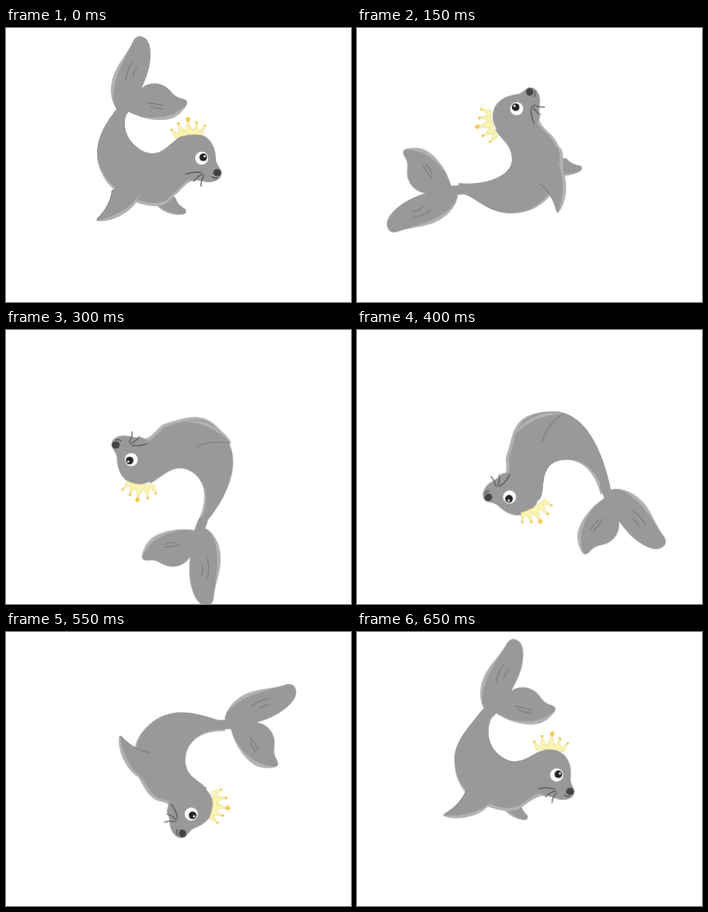
An HTML page without scripts that plays this animation: 432 px wide and 343 px high, repeating every 700 ms.

```html
<!DOCTYPE html>
<html lang="en">
<head>
<meta charset="utf-8">
<title>Seal doing a backflip</title>
<style>
html, body { margin: 0; width: 100%; height: 100%; overflow: hidden; background: #fff; }
svg { display: block; width: 432px; height: 343px; }

.main { fill: #999; }
.light { fill: #b2b2b2; }
.line { fill: none; stroke: #707070; stroke-width: .9; stroke-linecap: round; }
.whisker { fill: none; stroke: #505050; stroke-width: 1.2; stroke-linecap: round; }
.stem { fill: none; stroke: #999; stroke-width: 12; stroke-linecap: round; }

/* Poses are relative to the spinning stage; steps() gives one pose per 50 ms. */
.spin, .torso, .head, .crown, .tail, .near, .far { animation: 700ms infinite; }
.spin { animation-name: spin; }
.torso { animation-name: torso; }
.head { animation-name: head; }
.crown { animation-name: crown; }
.tail { animation-name: tail; }
.near { animation-name: near; }
.far { animation-name: far; }

@keyframes spin {
  0% { transform: rotate(0deg); animation-timing-function: steps(3); }
  21.42% { transform: rotate(-90deg); animation-timing-function: steps(2); }
  35.71% { transform: rotate(-180deg); animation-timing-function: steps(3); }
  57.14% { transform: rotate(-270deg); animation-timing-function: steps(2); }
  71.42% { transform: rotate(-270deg); animation-timing-function: steps(2); }
  85.71%, 100% { transform: rotate(-360deg); }
}
@keyframes torso {
  0% { d: path("M-71 -64C-84 -48 -96 -29 -96 -7S-80 43 -45 54S-7 51 2 44S16 26 28 26L12 -31C-2 -25 -10 -8 -27 -8S-72 -33 -57 -61Z"); animation-timing-function: steps(3); }
  21.42% { d: path("M-43 -88C-37 -65 -67 -55 -67 -15S-30 48 -5 48S10 45 22 40S40 18 54 18L38 -37C25 -30 20 -16 0 -16S-33 -50 -29 -82Z"); animation-timing-function: steps(2); }
  35.71% { d: path("M-11 -75C-48 -61 -78 -30 -76 5S-58 49 -35 55S-12 59 -2 55S14 47 23 56L35 -4C18 -1 -4 7 -16 -8S-32 -45 6 -79Z"); animation-timing-function: steps(3); }
  57.14% { d: path("M31 -107C10 -102 -63 -85 -63 -35S-35 14 -17 20S-5 23 7 23S17 27 19 32L49 -18C35 -26 23 -20 8 -29S-13 -82 41 -95Z"); animation-timing-function: steps(2); }
  71.42% { d: path("M0 -96C-15 -75 -47 -58 -47 -20S-5 37 15 36S40 30 47 23S55 22 65 29L63 -31C50 -30 43 -20 27 -22S-19 -52 13 -92Z"); animation-timing-function: steps(2); }
  85.71% { d: path("M9 -64C-40 -53 -62 -40 -66 -2S-50 45 -30 57S-5 65 3 63S14 61 19 71L40 16C26 14 12 17 2 6S-18 -29 21 -58Z"); animation-timing-function: steps(1); }
  92.85%, 100% { d: path("M-52 -69C-69 -47 -88 -29 -88 -5S-79 42 -45 54S-5 54 5 48S20 38 33 40L18 -14C10 -12 0 -3 -13 -3S-59 -23 -39 -63Z"); }
}
@keyframes head {
  0% { transform: translate(35px, -2px) rotate(0deg); animation-timing-function: steps(3); }
  21.42% { transform: translate(64px, -10px) rotate(-5deg); animation-timing-function: steps(2); }
  35.71% { transform: translate(45px, 34px) rotate(23deg); animation-timing-function: steps(3); }
  57.14% { transform: translate(44px, 19px) rotate(46deg); animation-timing-function: steps(2); }
  71.42% { transform: translate(78px, 3px) rotate(14deg); animation-timing-function: steps(2); }
  85.71% { transform: translate(42px, 55px) rotate(39deg); animation-timing-function: steps(1); }
  92.85%, 100% { transform: translate(40px, 14px) rotate(8deg); }
}
@keyframes crown {
  0% { transform: translate(19px, -31px) rotate(0deg); animation-timing-function: steps(3); }
  21.42% { transform: translate(45px, -40px) rotate(-8deg); animation-timing-function: steps(2); }
  35.71% { transform: translate(47px, 0px) rotate(32deg); animation-timing-function: steps(3); }
  57.14% { transform: translate(57px, -11px) rotate(67deg); animation-timing-function: steps(2); }
  71.42% { transform: translate(87px, -22px) rotate(58deg); animation-timing-function: steps(2); }
  85.71% { transform: translate(55px, 27px) rotate(58deg); animation-timing-function: steps(1); }
  92.85%, 100% { transform: translate(32px, -18px) rotate(10deg); }
}
@keyframes tail {
  0% { transform: translate(-62px, -62px) rotate(0deg); animation-timing-function: steps(3); }
  21.42% { transform: translate(-38px, -89.5px) rotate(-44deg); animation-timing-function: steps(2); }
  35.71% { transform: translate(2px, -83px) rotate(1.5deg); animation-timing-function: steps(3); }
  57.14% { transform: translate(41.6px, -104px) rotate(29deg); animation-timing-function: steps(2); }
  71.42% { transform: translate(8px, -104px) rotate(-23deg); animation-timing-function: steps(2); }
  85.71% { transform: translate(20.5px, -63px) rotate(28deg); animation-timing-function: steps(1); }
  92.85%, 100% { transform: translate(-41px, -65.5px) rotate(5deg); }
}
@keyframes near {
  0% { transform: translate(-77px, 38px) rotate(0deg); animation-timing-function: steps(3); }
  21.42% { transform: translate(-30px, 19px) rotate(31deg); animation-timing-function: steps(2); }
  35.71% { transform: translate(-39px, 13px) rotate(80deg); animation-timing-function: steps(3); }
  57.14% { transform: translate(-25px, -22px) rotate(97deg); animation-timing-function: steps(2); }
  71.42% { transform: translate(-8px, 10px) rotate(41deg); animation-timing-function: steps(2); }
  85.71% { transform: translate(-55px, 13px) rotate(53deg); animation-timing-function: steps(1); }
  92.85%, 100% { transform: translate(-73px, 33px) rotate(15deg); }
}
@keyframes far {
  0% { transform: translate(15px, 65px) rotate(0deg); animation-timing-function: steps(3); }
  21.42% { transform: translate(-10px, 71px) rotate(68deg); animation-timing-function: steps(2); }
  35.71% { transform: translate(-66px, 47px) rotate(105deg); animation-timing-function: steps(3); }
  57.14% { transform: translate(-40px, -40px) rotate(100deg); animation-timing-function: steps(2); }
  71.42% { transform: translate(-25px, 20px) rotate(50deg); animation-timing-function: steps(2); }
  85.71% { transform: translate(-40px, 30px) rotate(55deg); animation-timing-function: steps(1); }
  92.85%, 100% { transform: translate(3px, 68px) rotate(15deg); }
}
</style>
</head>
<body>
<svg viewBox="0 0 432 343">
  <defs>
    <clipPath id="torso-clip"><path class="torso"/></clipPath>
  </defs>
  <g transform="translate(210 165)">
    <g class="spin">
      <g class="far">
        <path class="main" d="M-37 -9C-30 0 -15 6 -2 3Q2 1 0 -3Q-10 -8 -13 -18L-25 -24Z"/>
        <path class="light" d="M-37 -9C-30 0 -15 6 -2 3C-14 3 -26 -1 -37 -9Z"/>
      </g>

      <path class="torso light"/>
      <g clip-path="url(#torso-clip)">
        <g transform="translate(0 -4)"><path class="torso main"/></g>
      </g>

      <g class="tail">
        <path class="stem" d="M2 -3L-8 9"/>
        <path class="main" d="M-9 -1C-17 -12 -19 -28 -13 -44C-8 -58 4 -71 10 -84C13 -92 18 -94 23 -92C31 -89 33 -80 33 -70C33 -52 27 -40 22 -28C28 -33 36 -35 44 -33C56 -30 60 -20 66 -17C72 -14 78 -15 79 -10C79 -5 72 2 63 8C46 16 20 10 4 1Z"/>
        <path class="light" d="M-13 -8C-17 -18 -18 -30 -13 -44C-8 -58 4 -71 10 -84C2 -66 -8 -50 -11 -36C-14 -24 -14 -16 -13 -8Z"/>
        <path class="light" d="M78 -7C74 2 66 8 60 10C46 15 28 11 16 7C32 10 50 10 62 4C70 0 75 -5 78 -7Z"/>
        <path class="line" d="M2 -37Q3 -50 10 -60M11 -42Q12 -50 16 -55M29 -9Q38 -9 48 -6M33 -5Q40 -2 48 -2"/>
      </g>

      <g class="head">
        <path class="main" d="M-34 14L-13 28C-6 26 2 30 10 30C20 29 25 25 25 18C24 12 19 10 18 2C18 -14 10 -31 -10 -31C-22 -31 -32 -22 -38 -16Z"/>
        <circle r="8.2" fill="#fff"/>
        <circle cx="2" cy="-1.2" r="4.8" fill="#222"/>
        <circle cx="3.8" cy="-2.4" r="1.4" fill="#fff"/>
        <ellipse cx="19.5" cy="18" rx="5" ry="4.5" fill="#444"/>
        <path class="whisker" d="M-20 20Q-10 16 0 18M-10 29Q-5 22 2 20M-1 35Q-1 27 3 22M13 23Q16 26 20 24"/>
      </g>

      <g class="crown">
        <path fill="#f9f5b0" stroke="#ecd98c" stroke-width=".8" d="M-17 4L-22 -6L-12 -1L-13 -14L-5 -4L-1 -17L5 -5L10 -15L12 -4L20 -11L17 0Q0 -3 -17 4Z"/>
        <g fill="#f3c548">
          <circle cx="-21.5" cy="-6.5" r="1.6"/>
          <circle cx="-13" cy="-14.5" r="1.7"/>
          <circle cx="9.5" cy="-15.5" r="1.7"/>
          <circle cx="20" cy="-11.5" r="1.6"/>
          <path d="M-1 -24L.2 -21.2L3 -21L1 -19L1.6 -16L-1 -17.6L-3.6 -16L-3 -19L-5 -21L-2.2 -21.2Z"/>
        </g>
      </g>

      <g class="near">
        <path class="main" d="M0 0C-1 12 -8 26 -19 36L-20 38C-4 41 16 31 26 20C31 14 35 7 36 2L20 -10Z"/>
        <path class="light" d="M-20 38C-4 41 16 31 26 20C31 14 34 8 35 4C28 16 12 32 -20 38Z"/>
        <path class="line" d="M0 0C-1 12 -8 26 -19 36"/>
      </g>
    </g>
  </g>
</svg>
</body>
</html>
```
